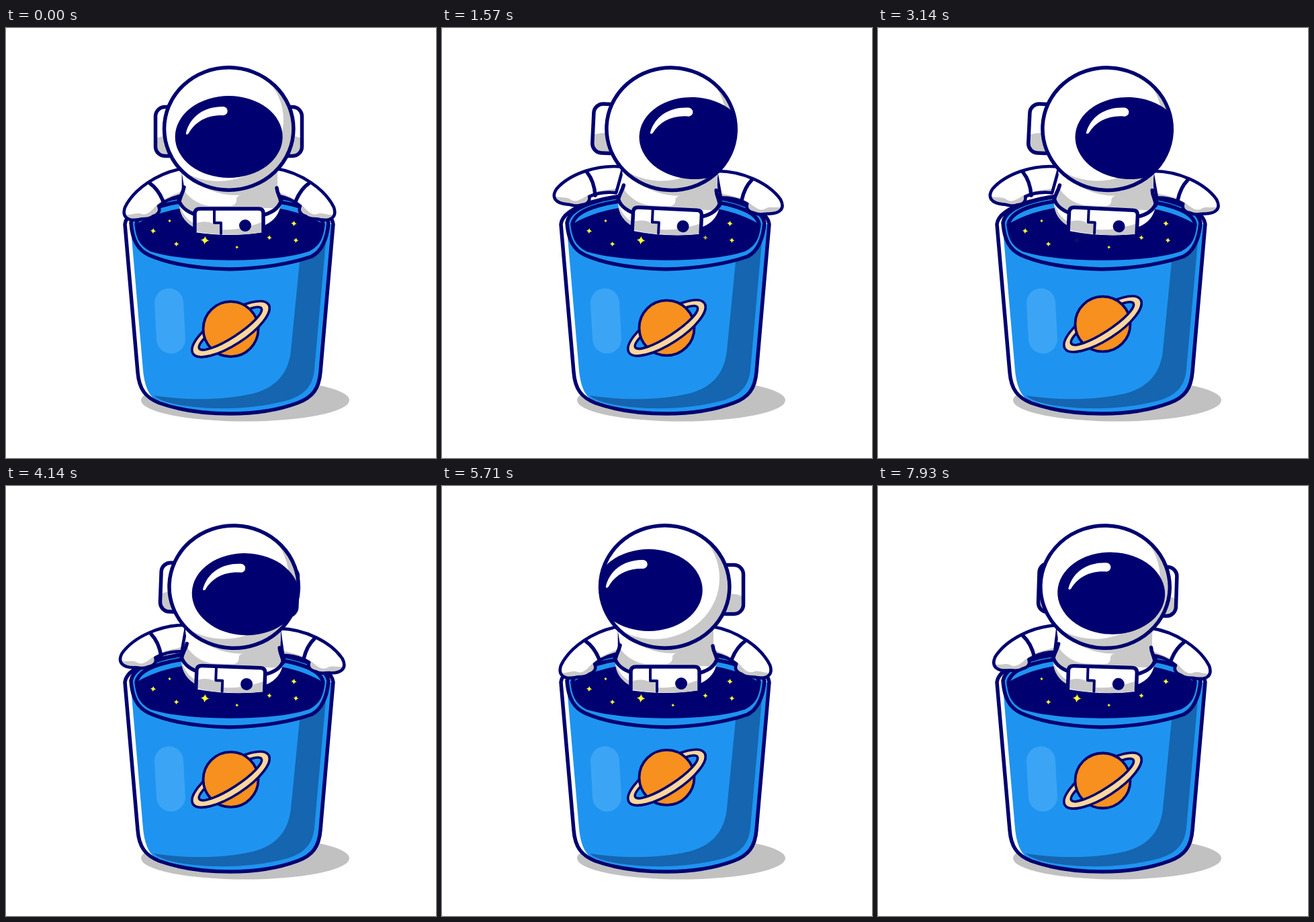
Write an HTML page that moves like this. It is 640 px wide and 640 px high and loops after 8000 ms.

```html
<!DOCTYPE html>
<html lang="en">
<head>
<meta charset="utf-8">
<title>Astronaut in a bucket of space</title>
<style>
  html, body { margin: 0; width: 100%; height: 100%; overflow: hidden; background: #fff; }
  svg { display: block; width: 100vw; height: 100vh; }
  .line { stroke: #000070; stroke-width: 5.5; stroke-linecap: round; stroke-linejoin: round; }
  .none { fill: none; }
  .navy { fill: #000070; }
  .white { fill: #fff; }
  .grey { fill: #c9c9c9; }
  .blue { fill: #1e94f0; }
  .shade { fill: #1565b0; }
  .ring { fill: #fbd79b; fill-rule: evenodd; stroke-width: 3.6; }
</style>
</head>
<body>
<svg viewBox="0 0 640 640">
  <defs>
    <path id="shell" d="M177 292L196 512C198 538 208 550 228 558C262 570 298 574 334 574C370 574 402 570 434 558C456 550 466 537 468 512L487 292C484 266 420 246 332 246C244 246 180 266 177 292Z"/>
    <clipPath id="helmetClip"><ellipse cx="331.7" cy="150" rx="96" ry="91"/></clipPath>
    <clipPath id="frontClip"><rect x="-80" y="0" width="160" height="40"/></clipPath>
    <path id="torsoShape" d="M260 205H404V238C403 250 406 256 409 262C407 276 400 287 384 294V303Q333 312 283 303V298C269 292 259 280 258 264C259 255 263 248 265 236Z"/>
    <clipPath id="torsoClip"><use href="#torsoShape"/></clipPath>
    <path id="armShape" d="M264 209C226 215 190 240 177 267C172 282 182 288 198 285C206 283 212 286 219 280C228 277 230 271 227 265C238 256 250 251 264 249Z"/>
    <clipPath id="armClip"><use href="#armShape"/></clipPath>
    <g id="arm">
      <use href="#armShape" class="white"/>
      <path class="grey" clip-path="url(#armClip)" d="M174 278C186 280 194 273 202 277C212 280 219 268 226 262C240 250 250 249 266 241V290H174Z"/>
      <use href="#armShape" class="line none" style="stroke-width:4.6"/>
      <path class="line none" d="M214 231Q228 241 235 261"/>
    </g>
    <g id="ear">
      <rect class="white" x="222.5" y="117.5" width="40" height="73" rx="14"/>
      <path class="grey" d="M223 165Q233 158 262 162V190H236Q224 190 223 176Z"/>
      <rect class="line none" x="222.5" y="117.5" width="40" height="73" rx="14"/>
    </g>
    <path id="ringShape" d="M-67 0A67 23.5 0 1 1 67 0A67 23.5 0 1 1 -67 0ZM-55 -1A55 13 0 1 0 55 -1A55 13 0 1 0 -55 -1Z"/>
  </defs>

  <ellipse cx="356" cy="554" rx="155" ry="31.5" fill="#c1c1c1"/>

  <g id="bucket">
    <use href="#shell" class="white"/>
    <path class="blue" d="M186 300L204 510C206 530 211 545 222 553C260 567 298 572 334 572C370 572 402 568 434 556C456 548 466 535 467 512L486 292Z"/>
    <path class="shade" d="M438 338L424 480C420 520 395 537 368 544C320 555 265 554 220 547C230 557 262 564 310 566C350 567 385 563 416 555C445 547 457 532 459 508L476 318Z"/>
    <path d="M242.5 409L245.5 463" stroke="#3ba4f5" stroke-width="43" stroke-linecap="round"/>
    <path class="line blue" d="M186 290C188 316 196 330 213 338C245 352 290 358 333 359C376 358 420 352 455 340C472 331 478 312 480 290C476 264 420 247 332 247C244 247 190 264 186 290Z"/>
    <path class="line blue" d="M194 292C196 310 200 322 216 330C250 340 290 343 333 343C376 343 420 340 450 330C466 322 470 310 472 292C468 270 420 254 332 254C244 254 198 270 194 292Z"/>
    <path class="navy" d="M194 292C196 310 200 322 216 330C250 340 290 344 333 344C376 344 420 340 450 330C466 322 470 310 472 292C436 270 390 263 333 263C276 263 230 270 194 292Z"/>
    <use href="#shell" class="line none"/>
  </g>

  <g id="stars" fill="#ffff32"></g>

  <g id="planet">
    <g transform="rotate(-33)"><use href="#ringShape" class="line ring"/></g>
    <circle r="41" fill="#f7901e" class="line" style="stroke-width:3.8"/>
    <g transform="rotate(-33)" clip-path="url(#frontClip)"><use href="#ringShape" class="line ring"/></g>
  </g>

  <g id="astronaut">
    <g id="leftArm"><use href="#arm"/></g>
    <g id="rightArm"><use href="#arm" transform="matrix(-1 0 0 1 665 0)"/></g>

    <use href="#torsoShape" class="white"/>
    <g clip-path="url(#torsoClip)" class="grey">
      <ellipse cx="343" cy="157" rx="97" ry="92"/>
      <path d="M258 228C264 246 282 264 306 265H334Q344 264 343 254Q343 249 358 246V205H412V268H284V300H256Z"/>
    </g>
    <path class="white" d="M258 262Q268 275 283 280V292Q264 284 258 262ZM409 262Q398 275 384 280V292Q402 284 409 262Z"/>
    <path class="line none" d="M265 237C263 247 258 252 258 260M257 254C259 266 270 274 283 278M403 238C404 248 409 252 409 260M410 254C408 266 398 274 384 278"/>
    <path class="white" d="M281 304V276Q281 269 289 269H376Q383 269 383 276V304Q333 312 281 304Z"/>
    <path class="grey" d="M284 290Q298 286 308 291H320V307Q300 307 284 303ZM322 300Q345 302 381 289V304Q350 309 322 307Z"/>
    <path class="line none" d="M281 303V276Q281 269 289 269H376Q383 269 383 276V303"/>
    <path class="line none" style="stroke-width:4" d="M310 271V290H320V306"/>
    <circle class="navy" cx="356" cy="294" r="9"/>

    <g id="leftEar"><use href="#ear"/></g>
    <g id="rightEar"><use href="#ear" transform="matrix(-1 0 0 1 663 0)"/></g>

    <g clip-path="url(#helmetClip)">
      <rect class="grey" x="230" y="50" width="210" height="200"/>
      <ellipse class="white" cx="316" cy="137" rx="97" ry="91"/>
      <g id="visor">
        <ellipse class="navy" rx="80" ry="61"/>
        <path class="white" d="M-64 -5C-58 -31 -36 -45 -9 -45A6.3 6.3 0 0 1 -8 -32C-32 -33 -50 -23 -60 -5Q-63 -2 -64 -5Z"/>
      </g>
    </g>
    <ellipse class="line none" cx="331.7" cy="150" rx="96.2" ry="91.2"/>
  </g>
</svg>

<script>
  const LOOP = 8000;
  const byId = id => document.getElementById(id);
  const move = (id, value) => byId(id).setAttribute('transform', value);
  const smooth = x => x * x * (3 - 2 * x);

  // Eased value along [time, value] keys.
  function track(t, keys) {
    for (let i = 1; i < keys.length; i++) {
      const [t0, v0] = keys[i - 1], [t1, v1] = keys[i];
      if (t <= t1) return v0 + (v1 - v0) * smooth((t - t0) / (t1 - t0));
    }
    return keys[keys.length - 1][1];
  }

  // Every part goes from rest to the right, to the left, and back again.
  const swing = (t, rest, right, left, next, times = [1430, 5500, 8670]) => track(t, [
    [0, rest], [times[0], right], [3450, right], [times[1], left], [7000, left], [times[2], next]
  ]);

  const stars = [
    { x: 219, y: 302, size: 4.3, dips: [7930] },
    { x: 243.5, y: 287, size: 2.5, dips: [3600, 6950] },
    { x: 253.5, y: 321.5, size: 3.8, dips: [] },
    { x: 296, y: 316, size: 6.3, dips: [3080] },
    { x: 343.7, y: 326.3, size: 2.5, dips: [1600, 4800] },
    { x: 392, y: 312, size: 3.8, dips: [630, 1880] },
    { x: 428.5, y: 291, size: 4.2, dips: [7000] },
    { x: 431.5, y: 316, size: 4, dips: [4790, 7930] }
  ];
  for (const star of stars) {
    const { x, y, size: s } = star, c = s * 0.18;
    star.node = document.createElementNS('http://www.w3.org/2000/svg', 'path');
    star.node.setAttribute('d', `M0 ${-s}Q${c} ${-c} ${s} 0Q${c} ${c} 0 ${s}Q${-c} ${c} ${-s} 0Q${-c} ${-c} 0 ${-s}Z`);
    star.node.setAttribute('transform', `translate(${x} ${y}) rotate(6)`);
    byId('stars').append(star.node);
  }
  const brightness = (t, dips) => Math.min(1, ...dips.map(d => smooth(Math.min(1, Math.abs(t - d) / 480))));

  function draw(t) {
    const tilt = swing(t, 0, 2.7, 0, 2.7, [1300, 5800, 8500]);
    const left = swing(t, 0, 15.5, 0, 12, [1200, 5200, 8670]);
    const right = swing(t, 0, -10, 0, -2, [1430, 5900, 8900]);

    move('astronaut', `rotate(${tilt} 331 350)`);
    move('leftArm', `translate(${-left * 0.28} 0) rotate(${left - tilt} 262 225)`);
    move('rightArm', `translate(${-right * 0.4} 0) rotate(${right - tilt} 402 225)`);
    move('leftEar', `translate(${swing(t, 0, -7, 21, 3)} 0)`);
    move('rightEar', `translate(${swing(t, 0, -22, 8, -10)} 0)`);
    move('visor', `translate(${331.7 + swing(t, 0, 33, -24, 33)} ${149.5 + swing(t, 12.5, 12.7, 5.5, 12.7)})`);
    move('planet', `translate(334.5 ${441 + 7.2 * Math.cos(2 * Math.PI * (t - 300) / 11000)})`);
    for (const star of stars) star.node.setAttribute('opacity', brightness(t, star.dips));
  }

  function frame() {
    draw(performance.now() % LOOP);
    requestAnimationFrame(frame);
  }
  frame();
</script>
</body>
</html>
```
